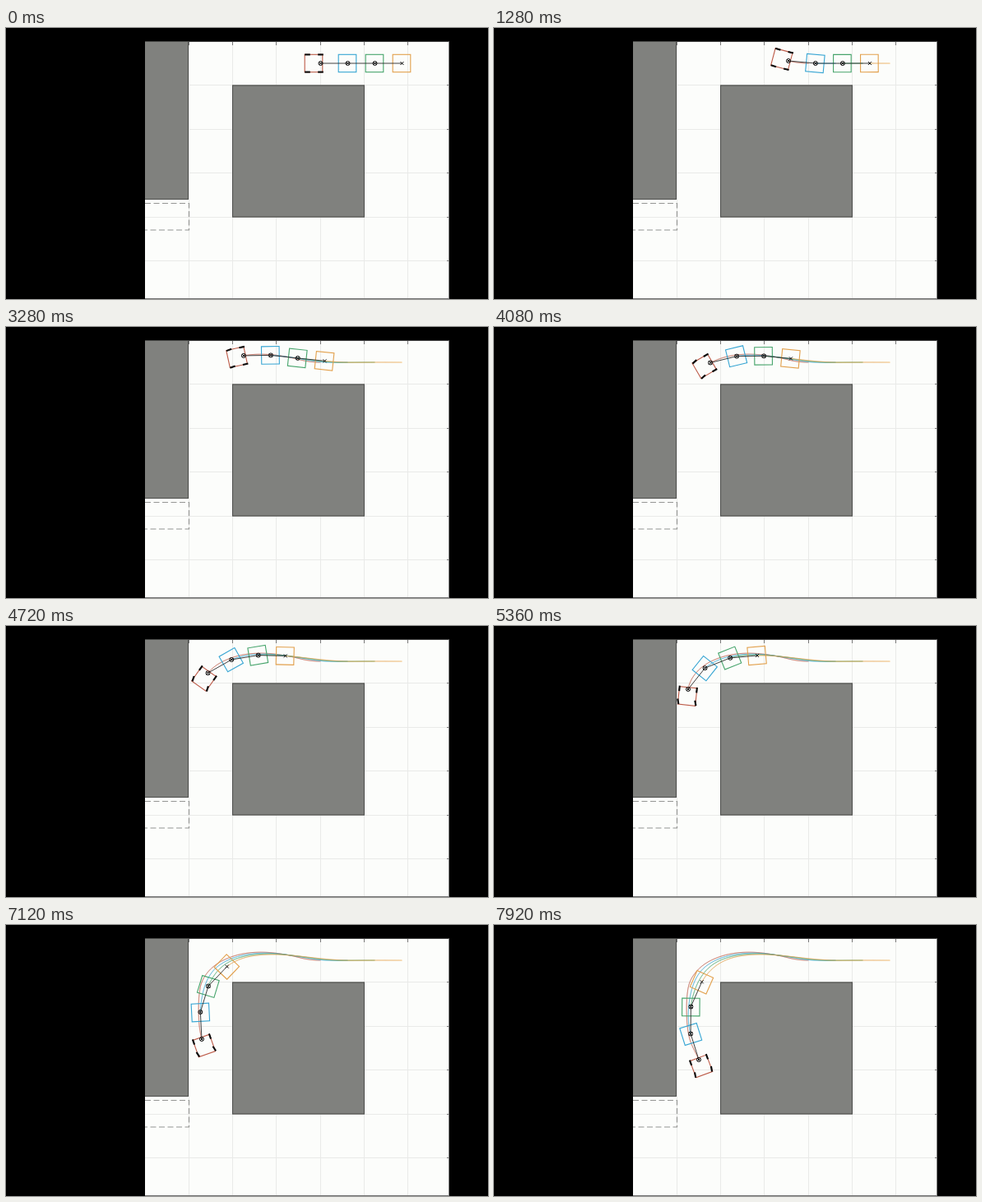
An HTML page with a canvas that plays this animation: 586 by 330 pixels, repeating every 8 s.

```html
<!DOCTYPE html>
<html>
<head>
<meta charset="utf-8">
<style>
html, body { margin: 0; width: 100%; height: 100%; overflow: hidden; background: #000; }
canvas { display: block; }
</style>
</head>
<body>
<canvas id="stage" width="586" height="330"></canvas>
<script>
const ctx = document.getElementById('stage').getContext('2d');
const STEP = 80, COUNT = 100, SUB = 8;
// Joint spacing, and the distance from a front joint to the trailer's axle
const LINK = 33, AXLE = 24;
const WHEELBASE = 16, OVERHANG = 4, SPEED = 35, RAMP = 1.15;
const COLORS = ['#bd5b48', '#36a5d3', '#46a46b', '#e2a04c'];

// Waypoints of the tractor's rear joint: distance, x, y, direction in degrees
const WAY = [
  [0, 382.5, 43, 0],
  [24.7, 358, 40, -14],
  [66.7, 316.3, 33.3, -2.5],
  [122.7, 263, 43.5, 27],
  [167.5, 236, 77, 80],
  [198, 234.2, 107, 91],
  [229.1, 238, 139, 106],
  [257.1, 249, 164, 113]
];

const travel = t => t < RAMP ? SPEED * t * t / (2 * RAMP) : SPEED * (t - RAMP / 2);
const tangent = deg => [-Math.cos(deg * Math.PI / 180), Math.sin(deg * Math.PI / 180)];

// Hermite curve through the waypoints: position and direction at distance s
function pathAt(s) {
  let i = 0;
  while (i < WAY.length - 2 && s > WAY[i + 1][0]) i++;
  const a = WAY[i], b = WAY[i + 1], len = b[0] - a[0], u = (s - a[0]) / len;
  const m = tangent(a[3]), n = tangent(b[3]);
  const p = [], d = [];
  for (let k = 0; k < 2; k++) {
    const p0 = a[k + 1], diff = b[k + 1] - p0, m0 = m[k] * len, m1 = n[k] * len;
    const c2 = 3 * diff - 2 * m0 - m1, c3 = m0 + m1 - 2 * diff;
    p.push(p0 + u * (m0 + u * (c2 + u * c3)));
    d.push(m0 + u * (2 * c2 + 3 * u * c3));
  }
  return { p, angle: Math.atan2(d[1], d[0]) };
}

function curvature(s) {
  const turn = pathAt(s + 5).angle - pathAt(s - 5).angle;
  const wrapped = Math.atan2(Math.sin(turn), Math.cos(turn));
  return wrapped / 10 * Math.min(1, s / 8);
}

// Each trailer pivots about its axle, so its rear joint swings wide
function simulate() {
  const log = [];
  const angles = [Math.PI, Math.PI, Math.PI];
  let pts = [0, 1, 2, 3].map(i => [382.5 + i * LINK, 43]);
  for (let k = 0; k <= (COUNT - 1) * SUB; k++) {
    const next = [pathAt(travel(k * STEP / SUB / 1000)).p];
    for (let i = 0; i < 3; i++) {
      const [x, y] = next[i], dx = x - pts[i][0], dy = y - pts[i][1];
      angles[i] += (Math.cos(angles[i]) * dy - Math.sin(angles[i]) * dx) / AXLE;
      next.push([x - LINK * Math.cos(angles[i]), y - LINK * Math.sin(angles[i])]);
    }
    pts = next;
    log.push(pts);
  }
  return log;
}
const log = simulate();

function line(points, color, width) {
  ctx.beginPath();
  points.forEach(p => ctx.lineTo(p[0], p[1]));
  ctx.strokeStyle = color;
  ctx.lineWidth = width;
  ctx.stroke();
}

function block(x, y, w, h) {
  ctx.fillStyle = '#80817e';
  ctx.fillRect(x, y, w, h);
  ctx.strokeStyle = '#4c4d4b';
  ctx.lineWidth = 1;
  ctx.strokeRect(x + 0.5, y + 0.5, w - 1, h - 1);
}

function drawScene() {
  ctx.fillStyle = '#000';
  ctx.fillRect(0, 0, 586, 330);
  ctx.save();
  ctx.beginPath();
  ctx.rect(169, 16, 369.5, 314);
  ctx.clip();
  ctx.fillStyle = '#fcfdfb';
  ctx.fillRect(169, 16, 370, 314);
  for (let i = 0; i < 6; i++) {
    const x = Math.round(221.8 + i * 53.25) + 0.5, y = Math.round(16 + i * 53.4) + 0.5;
    line([[x, 16], [x, 330]], '#e9eae8', 1);
    line([[169, y], [538, y]], '#e9eae8', 1);
    line([[x, 16], [x, 21]], '#777', 1);
    line([[536, y], [539, y]], '#777', 1);
  }
  line([[169, 16.5], [539, 16.5]], '#444', 1);
  line([[169, 329.5], [539, 329.5]], '#777', 1);
  block(168, 16, 54, 193);
  block(275, 69.5, 161, 161);
  ctx.setLineDash([7, 3.5]);
  line([[169, 213.5], [222.5, 213.5], [222.5, 246], [169, 246]], '#949593', 1.2);
  ctx.setLineDash([]);
  ctx.restore();
}

function placed(p, angle, draw) {
  ctx.save();
  ctx.translate(p[0], p[1]);
  ctx.rotate(angle);
  draw();
  ctx.restore();
}

function box(cx, color) {
  ctx.strokeStyle = color;
  ctx.lineWidth = 1.1;
  ctx.strokeRect(cx - 10.8, -10.7, 21.6, 21.4);
}

function marker([x, y], ring) {
  const r = 2;
  line([[x - r, y - r], [x + r, y + r]], '#111', 1);
  line([[x - r, y + r], [x + r, y - r]], '#111', 1);
  if (!ring) return;
  ctx.beginPath();
  ctx.arc(x, y, 2.5, 0, 7);
  ctx.stroke();
}

function render(k) {
  drawScene();
  const pts = log[k * SUB];
  const s = travel(k * STEP / 1000);
  const past = log.slice(0, k * SUB + 1);
  COLORS.forEach((c, i) => line(past.map(f => f[i]), c, 1));

  for (let i = 3; i > 0; i--) {
    const angle = Math.atan2(pts[i - 1][1] - pts[i][1], pts[i - 1][0] - pts[i][0]);
    placed(pts[i], angle, () => box(0.5, COLORS[i]));
  }
  const bend = curvature(s);
  const heading = pathAt(s).angle + Math.atan(OVERHANG * bend);
  const steer = Math.atan(WHEELBASE * bend);
  placed(pts[0], heading, () => {
    box(8.5, COLORS[0]);
    for (const x of [0, WHEELBASE]) for (const y of [-10.6, 10.6])
      placed([x, y], x ? steer : 0, () => line([[-3.3, 0], [3.3, 0]], '#0a0a0a', 2.1));
  });

  line(pts, '#2b2b2b', 0.9);
  pts.forEach((p, i) => marker(p, i < 3));
}

function tick() {
  render(Math.floor(performance.now() / STEP) % COUNT);
  requestAnimationFrame(tick);
}
tick();
</script>
</body>
</html>
```
